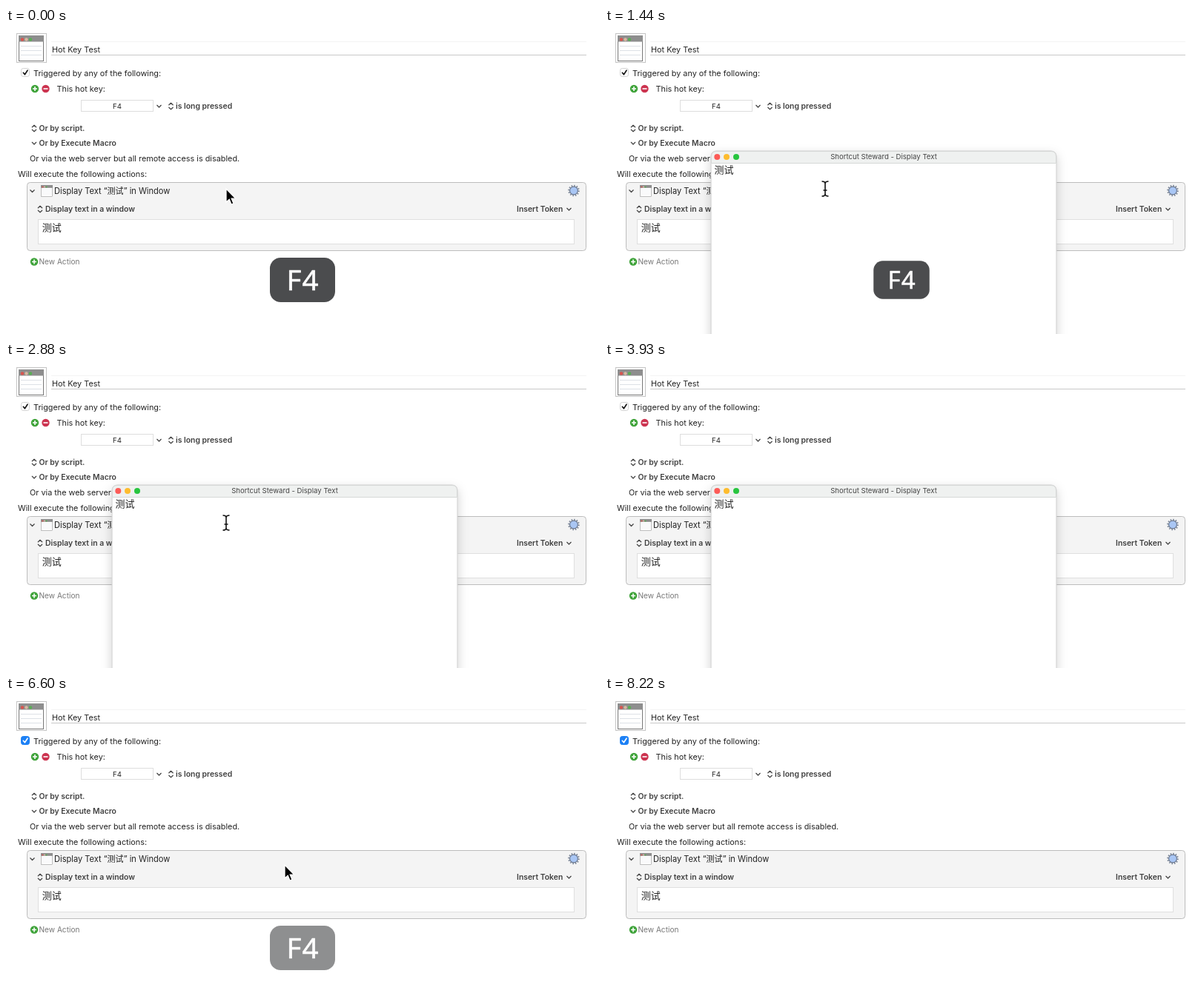
Write an HTML page that moves like this. It is 800 px wide and 413 px high and loops after 8430 ms.

```html
<!DOCTYPE html>
<html lang="en">
<head>
<meta charset="utf-8">
<title>Hot key test</title>
<style>
html, body { margin: 0; width: 100%; height: 100%; overflow: hidden; background: #fff; }
svg { display: block; width: 800px; height: 413px; }
text { font: 10.85px Inter, "Noto Sans CJK SC", sans-serif; fill: #222; white-space: pre; }
.bold { font-size: 10.4px; font-weight: 600; fill: #404040; }
.cjk { font: 13px "Noto Sans CJK SC", "Noto Sans CJK", sans-serif; }
.small { font-size: 9.6px; text-anchor: middle; }
.key { font: 38.5px "Noto Sans", sans-serif; letter-spacing: 1.2px; fill: #fff; stroke: #fff; stroke-width: .6; stroke-linejoin: round; text-anchor: middle; }
.glyph { fill: none; stroke: #444; stroke-width: 1.25; stroke-linecap: round; stroke-linejoin: round; }
</style>
</head>
<body>
<svg viewBox="0 0 800 413">
  <defs>
    <g id="down"><path class="glyph" d="M-2.7-1.2L0 1.5L2.7-1.2"/></g>
    <g id="updown"><path class="glyph" d="M-2.7-1.7L0-4.3L2.7-1.7M-2.7 1.7L0 4.3L2.7 1.7"/></g>
    <g id="plus"><circle r="5.2" fill="#3fa33a"/><path d="M-3 0H3M0-3V3" stroke="#fff" stroke-width="1.6"/></g>
    <g id="icon">
      <rect x=".5" y=".5" width="33" height="34" fill="#fff" stroke="#777"/>
      <path d="M0 0H34V8.5H0Z" fill="#8e8e8e"/>
      <circle cx="5" cy="5.5" r="2.2" fill="#d8544f"/><circle cx="10.5" cy="5.5" r="2.2" fill="#d9b9a0"/><circle cx="16" cy="5.5" r="2.2" fill="#59ad55"/>
      <path d="M3 14.5H31M3 20.5H31M3 26.5H31" stroke="#dde1e6"/>
    </g>
    <filter id="shadow" x="-20%" y="-20%" width="140%" height="140%">
      <feDropShadow dx="0" dy="5" stdDeviation="7" flood-opacity=".18"/>
    </filter>
  </defs>

  <rect x="14.5" y="7.5" width="40" height="39" fill="#fff" stroke="#c4c4c4"/>
  <use href="#icon" x="17" y="10"/>
  <path d="M61 18.5H783" stroke="#f4f4f4"/>
  <path d="M61 36.5H783" stroke="#c9c9c9"/>
  <text x="62" y="32.5">Hot Key Test</text>

  <rect id="box" x="20.5" y="54.5" width="11" height="11" rx="2.8"/>
  <path id="check" d="M23.3 60.3L25.4 62.8L29 57.2" fill="none" stroke-width="1.6" stroke-linecap="round" stroke-linejoin="round"/>
  <text x="37" y="64.5">Triggered by any of the following:</text>
  <use href="#plus" x="39" y="82"/>
  <circle cx="53.5" cy="82" r="5.2" fill="#cc3450"/><path d="M50.5 82H56.5" stroke="#fff" stroke-width="1.6"/>
  <text x="68.5" y="86">This hot key:</text>
  <rect x="101.5" y="97.5" width="97" height="15" fill="#fff" stroke="#dedede"/>
  <text class="small" x="150" y="108.5">F4</text>
  <use href="#down" x="206.5" y="105.5"/>
  <use href="#updown" x="222.5" y="105.5"/>
  <text class="bold" x="229" y="109">is long pressed</text>
  <use href="#updown" x="38" y="135.5"/>
  <text class="bold" x="44.5" y="139">Or by script.</text>
  <use href="#down" x="38" y="155.5"/>
  <text class="bold" x="44.5" y="158.5">Or by Execute Macro</text>
  <text x="32" y="179.5">Or via the web server but all remote access is disabled.</text>
  <text x="16" y="201">Will execute the following actions:</text>

  <rect x="28.5" y="208.5" width="754" height="92" rx="4" fill="#f4f4f4" stroke="#bdbdbd"/>
  <use href="#down" x="35.5" y="220"/>
  <use href="#icon" transform="translate(47 212) scale(.47 .45)"/>
  <text x="65" y="224" style="font-size:11.05px">Display Text “测试” in Window</text>
  <circle cx="766" cy="219.5" r="6.8" fill="none" stroke="#7b8698" stroke-width="2" stroke-dasharray="1.6 1.96"/>
  <circle cx="766" cy="219.5" r="5.4" fill="#a9c6f4" stroke="#66738a" stroke-width="1.1"/>
  <use href="#updown" x="46" y="244.5"/>
  <text class="bold" x="53" y="248">Display text in a window</text>
  <text class="bold" x="689" y="248">Insert Token</text>
  <use href="#down" x="759.5" y="244.5"/>
  <rect x="43.5" y="258.5" width="723" height="33" fill="#fff" stroke="#dfdfdf"/>
  <text class="cjk" x="48.7" y="273.5">测试</text>
  <use href="#plus" x="38" y="315.5"/>
  <text x="44.5" y="319" style="font-size:10.1px;fill:#777">New Action</text>

  <g id="popup">
    <rect x="143" y="166" width="466" height="300" rx="7" fill="#fff" stroke="#cacaca" filter="url(#shadow)"/>
    <path d="M143.5 182.5V173Q143.5 166.5 150 166.5H602Q608.5 166.5 608.5 173V182.5Z" fill="#eff1f0" stroke="#d6d8d7"/>
    <circle cx="151.3" cy="174" r="4" fill="#fc5b57"/><circle cx="164" cy="174" r="4" fill="#fdbc2e"/><circle cx="177" cy="174" r="4" fill="#28c53f"/>
    <text class="small" x="376" y="177.3" style="fill:#444">Shortcut Steward - Display Text</text>
    <text class="cjk" x="147.6" y="195.5">测试</text>
  </g>

  <g id="badge">
    <rect x="-44" y="-30" width="88" height="60" rx="14.5" fill="#4b4c4e"/>
    <text class="key" x=".6" y="13.8">F4</text>
  </g>

  <g id="pointer">
    <path id="arrow" d="M0 0V17L4 13.4L6.6 19.8L9.4 18.6L6.8 12.4H12Z" transform="scale(1.06)" stroke="#fff" stroke-width="1.2"/>
    <path id="beam" d="M-4.5-10Q0-10 0-7Q0-10 4.5-10M0-7V7M-4.5 10Q0 10 0 7Q0 10 4.5 10M-2.5 2H2.5" fill="none" stroke="#111" stroke-width="1.6"/>
  </g>
</svg>
<script>
const LOOP = 8430, STEP = 30;
const OPEN = 1110, CLOSE = 4710;
const [box, check, popup, badge, pointer, arrow, beam] =
  ["box", "check", "popup", "badge", "pointer", "arrow", "beam"].map(id => document.getElementById(id));
const set = (el, attrs) => { for (const name in attrs) el.setAttribute(name, attrs[name]); };
const ramp = (t, from, to) => Math.min(1, Math.max(0, (t - from) / (to - from)));
const easeOut = p => 1 - (1 - p) ** 3;
const easeInOut = p => p * p * (3 - 2 * p);
const fadeOut = (t, start) => (1 - ramp(t, start, start + 180)) ** 2.6;

function drawBadge(t) {
  const tapped = t >= 5430;
  const pressed = tapped
    ? easeOut(ramp(t, 5430, 5550)) - easeInOut(ramp(t, 5580, 5730))
    : easeOut(ramp(t, 210, 900)) - easeInOut(ramp(t, 1410, 1680));
  const opacity = tapped ? ramp(t, 5430, 5520) * fadeOut(t, 6570) : fadeOut(t, 2430);
  set(badge, { opacity, transform: `translate(400 340) scale(${1 - 0.147 * pressed})` });
}

function drawPopup(t) {
  const shown = easeOut(ramp(t, OPEN - STEP, OPEN + 180)), closed = ramp(t, CLOSE, CLOSE + 150);
  const scale = 0.9 + 0.1 * shown - 0.04 * closed;
  set(popup, { opacity: shown * (1 - closed), transform: `translate(376 316) scale(${scale}) translate(-376 -316)` });
}

function drawPointer(t) {
  const toButton = easeInOut(ramp(t, 4350, 4650)), away = easeInOut(ramp(t, CLOSE, 4980));
  const x = 297 - 146 * toButton + 225 * away;
  const y = 217 - 43 * toButton + 54 * away;
  const overText = t >= OPEN && t < CLOSE && y > 183;
  const opacity = t < 4380 ? 1 - ramp(t, 3270, 3570) : 1 - ramp(t, 7830, 8130);
  set(pointer, { opacity, transform: `translate(${x} ${y})` });
  set(arrow, { visibility: overText ? "hidden" : "visible" });
  set(beam, { visibility: overText ? "visible" : "hidden" });
}

function draw() {
  const t = Math.floor(performance.now() % LOOP / STEP) * STEP;
  const active = t >= CLOSE + 60;
  set(box, { fill: active ? "#1c80f5" : "#fff", stroke: active ? "#1c80f5" : "#d2d2d2" });
  set(check, { stroke: active ? "#fff" : "#111" });
  drawPopup(t);
  drawBadge(t);
  drawPointer(t);
  requestAnimationFrame(draw);
}
draw();
</script>
</body>
</html>
```
